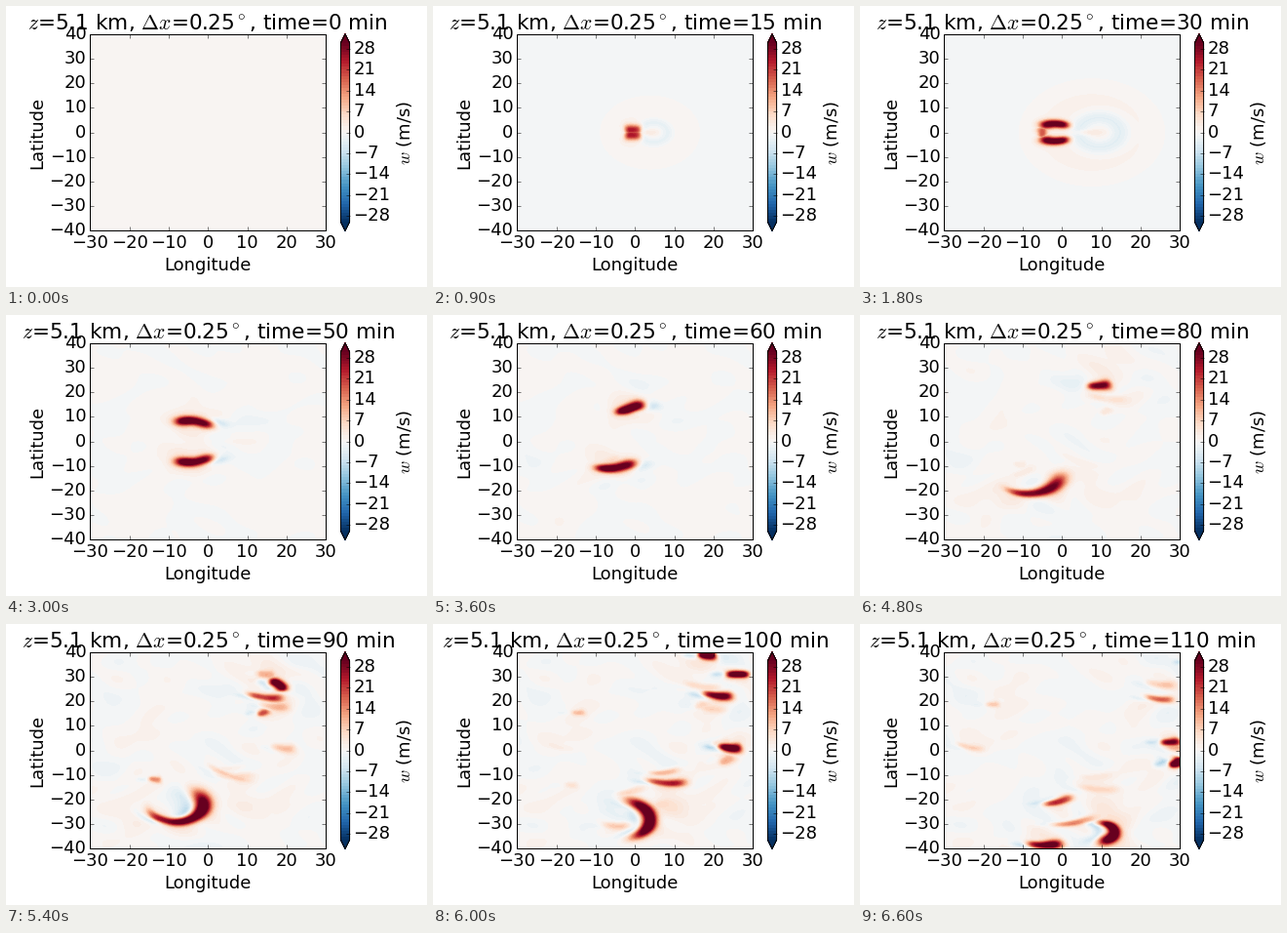
Animation, 432 px wide and 288 px high, one loop 6.9 s. Source, as a matplotlib script:

```python
import numpy as np
import matplotlib.pyplot as plt
from matplotlib.animation import FuncAnimation

plt.style.use("classic")
plt.rcParams.update({
    "font.family": "DejaVu Sans", "font.size": 18, "mathtext.fontset": "cm",
    "figure.dpi": 72, "savefig.dpi": 72,
    "figure.facecolor": "white", "savefig.facecolor": "white",
})

W, H = 432, 288
FRAMES, INTERVAL, MINUTES = 23, 300, 5
LEVELS = np.arange(-30, 31)

X, Y = np.meshgrid(np.linspace(-30, 30, 221).astype("float32"),
                   np.linspace(-40, 40, 201).astype("float32"))

# Key poses: minute, lon, lat, heading, half length, width, bend, taper
SPLIT = np.array([
    (0, 0, 0, 0, 1.2, 2, -.1, 0),
    (20, -.7, 1.4, 0, 2.2, 1.9, -.2, 0),
    (30, -1.9, 3.5, 0, 3.7, 1.5, -.6, -.1),
    (50, -3.4, 8.3, -10, 4.9, 1.7, -.6, 0),
])
MIRROR = np.array([1, 1, -1, -1, 1, 1, -1, 1])
NORTH = np.vstack([SPLIT, [
    (70, 1, 18.6, 65, 3, 1.8, .7, .5),
    (90, 18, 26.8, -50, 2.8, 1.5, -.4, 0),
    (100, 26, 31, 0, 2.9, 1.3, -.1, 0),
    (110, 35, 36, 0, 2.9, 1.3, -.1, 0),
]])
SOUTH = np.vstack([SPLIT * MIRROR, [
    (70, -6, -13.2, 14, 5.8, 1.7, .4, .45),
    (90, -4, -27.5, 38, 12, 1.8, 1.7, .4),
    (100, 3.8, -27.5, 95, 9.5, 1.8, 1.2, .1),
    (110, 13.3, -33.2, 90, 6, 1.5, 1.6, -.3),
]])

# Short-lived cells: minute, lon, lat, heading, half length, peak
CELLS = [
    (30, -5, 0, 90, 2, 18),
    (70, -8, -10.5, 35, 3, 12),
    (90, 14.5, 21.5, -10, 4.5, 24),
    (90, 14, 15.3, 40, 1.5, 18),
    (90, -13.5, -11.8, -15, 1.5, 13),
    (90, 5, -10, -30, 6, 7),
    (100, 21, 22.2, -10, 3.8, 34),
    (100, 18.3, 38.6, -10, 2.3, 36),
    (100, 24, 1, -12, 3, 38),
    (100, 8, -13.3, -5, 5, 22),
    (100, 7.5, -9, 10, 4, 9),
    (105, -16, 17, 0, 1.6, 8),
    (110, 24.8, 20.8, -10, 3.5, 18),
    (110, 27.5, 3.3, 5, 2.5, 28),
    (110, 29.3, -5, 40, 2.2, 40),
    (110, -.8, -20.8, 25, 4, 21),
    (110, 3, -29.5, 15, 6, 14),
    (110, -4.5, -38.5, 0, 4.5, 36),
    (110, -23.5, 1.2, -20, 3.5, 6),
]


def arc(x, y, heading, length, width, bend, taper=0):
    """Soft curved band of unit strength; bend is its half turn in radians."""
    a = np.radians(heading)
    u = (X - x) * np.cos(a) + (Y - y) * np.sin(a)
    v = (Y - y) * np.cos(a) - (X - x) * np.sin(a)
    if bend < 0:
        v = -v
    radius = length / max(abs(bend), .05)
    s = radius * np.arctan2(u, radius - v) / length
    d = np.hypot(u, radius - v) - radius
    w = width * (1 + taper * np.clip(s, -1, 1))
    return np.exp(-(d / w) ** 2 - s ** 4)


def storm(keys, t):
    pose = [np.interp(t, keys[:, 0], col) for col in keys.T[1:]]
    return np.interp(t, [0, 5, 10, 20, 50], [0, 3, 15, 34, 37]), pose


def cell(spec, t):
    """Grow and fade around the peak minute, moving away from the centre."""
    minute, x, y, heading, length, peak = spec
    dt = t - minute
    gain = np.clip(1.5 * (1 - abs(dt) / 12), 0, 1)
    drift = 1 + .02 * dt
    pose = [x * drift, y * drift, heading, length, .8 + .02 * peak, .35, .25]
    return gain * peak, pose


rng = np.random.default_rng(11)
WAVES = [(rng.uniform(.15, .65), rng.uniform(0, np.pi),
          rng.uniform(0, 2 * np.pi), rng.uniform(-.05, .05))
         for _ in range(20)]


def ripples(t):
    """Weak background pattern of rising and sinking air."""
    x = X + 2.5 * np.sin(Y / 5)
    y = Y + 2.5 * np.sin(X / 6)
    total = sum(np.sin(k * (x * np.cos(a) + y * np.sin(a)) + p + s * t)
                for k, a, p, s in WAVES)
    return total / np.sqrt(len(WAVES) / 2)


def ring(t):
    """Outflow that spreads around the first updraft."""
    gain = np.interp(t, [0, 10, 30, 50, 65], [0, .7, 1, .3, 0])
    size = .35 + .65 * min(t, 50) / 30
    cx = 9.5 * min(t / 30, 1.1)
    outer = np.hypot(X - .8 * cx, Y * .85) / (17 * size)
    r = np.hypot(X - cx, Y / 1.15) / size
    calm = 3.2 * np.exp(-((X - .6 * cx) / (4 * size)) ** 2 - Y ** 2)
    return gain * (1.6 * np.exp(-outer ** 6)
                   - 4.4 * np.exp(-((r - 5.2) / 2.7) ** 2) + calm)


def wind(t):
    core, halo, sink, stir = (np.zeros_like(X) for _ in range(4))
    mature = np.clip((t - 35) / 15, 0, 1)
    lee = 4 * np.tanh((80 - t) / 8)
    bands = [storm(NORTH, t), storm(SOUTH, t)] + [cell(c, t) for c in CELLS]
    for peak, (x, y, heading, length, width, bend, taper) in bands:
        if peak < .01:
            continue
        shape = heading, length, width, bend, taper
        wide = heading, 1.4 * length, 2.8 * width, bend
        core = np.maximum(core, peak * arc(x, y, *shape))
        halo = np.maximum(halo, .08 * peak * arc(x, y, *wide))
        sink = np.maximum(sink, .22 * peak * arc(x + lee, y, *shape))
        near = np.exp(-((X - x) ** 2 + (Y - y) ** 2) / 90)
        stir = np.maximum(stir, peak / 36 * near)
    base = np.interp(t, [0, 5, 30, 50], [.01, -.15, -.3, .05])
    rough = np.interp(t, [30, 50, 90], [0, .3, .6])
    return (base + ring(t) + core + mature * (halo - sink)
            + rough * (1 + 1.8 * stir) * ripples(t))


def paint(t):
    return ax.contourf(X, Y, wind(t), LEVELS, cmap="RdBu_r",
                       vmin=-30, vmax=30, extend="both")


fig = plt.figure(figsize=(W / 72, H / 72), dpi=72)
ax = fig.add_axes([.2, .2, .56, .7])
cax = fig.add_axes([.795, .2, .0212, .7])
filled = paint(0)
ax.set(xlim=(-30, 30), ylim=(-40, 40),
       xticks=range(-30, 31, 10), yticks=range(-40, 41, 10))
fig.colorbar(filled, cax=cax, ticks=range(-28, 29, 7))
cax.minorticks_off()

side = dict(rotation=90, rotation_mode="anchor", ha="center", va="baseline")
fig.text(.48, 1 - 271 / H, "Longitude", ha="center", va="baseline")
fig.text(37 / W, .55, "Latitude", **side)
fig.text(415 / W, .55, "$w$ (m/s)", **side)


def update(i):
    global filled
    t = i * MINUTES
    filled.remove()
    filled = paint(t)
    ax.set_title(rf"$z$=5.1 km, $\Delta x$=0.25$^\circ$, time={t} min")
    return []


anim = FuncAnimation(fig, update, frames=FRAMES, interval=INTERVAL,
                     init_func=lambda: [], repeat=True, repeat_delay=0)
plt.show()
```
